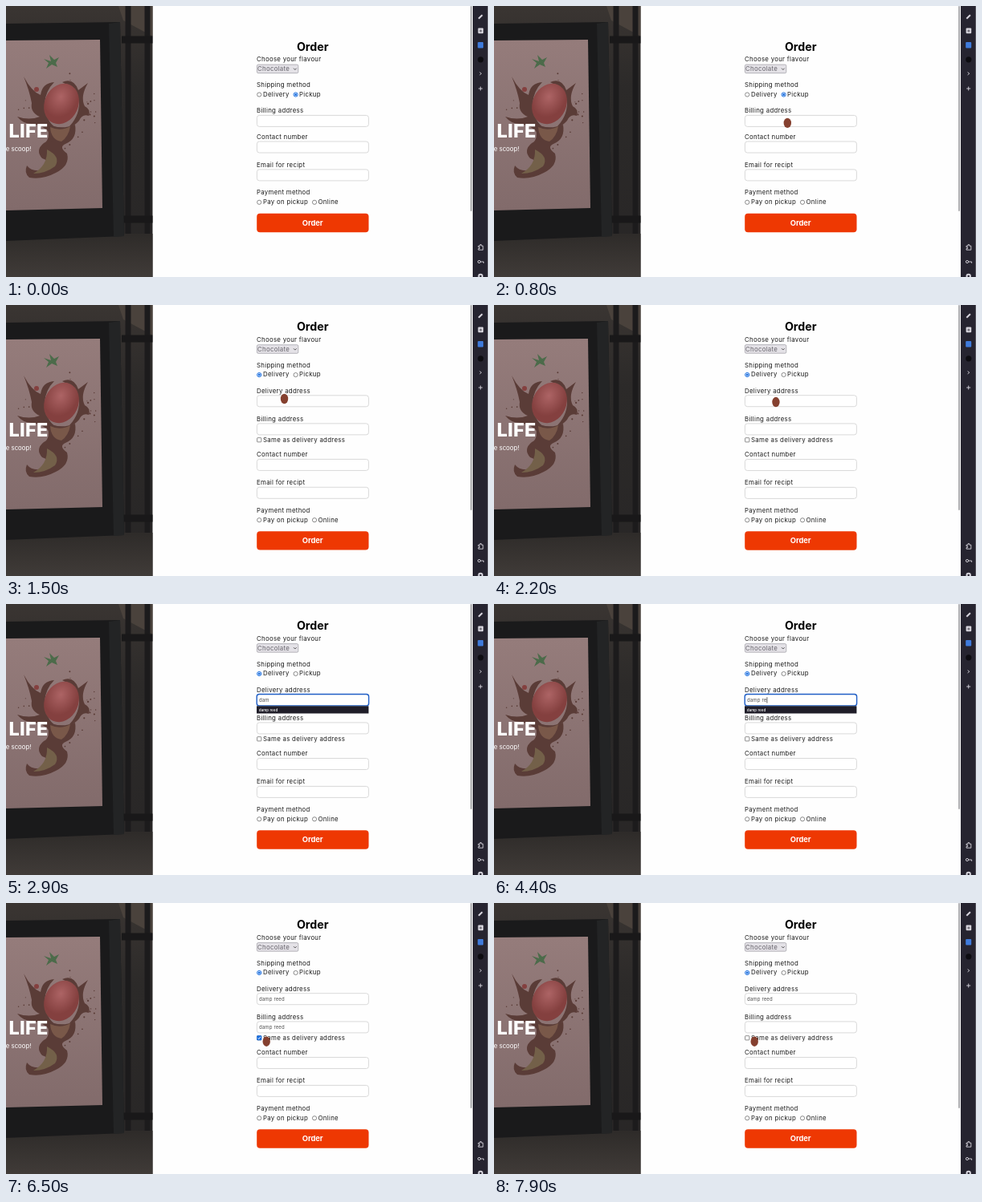
An HTML page for the animation above (8000 ms loop, 600 by 338 pixels).

```html
<!DOCTYPE html>
<html lang="en">
<head>
<meta charset="utf-8">
<title>Order form</title>
<style>
  html, body { margin: 0; width: 100%; height: 100%; overflow: hidden; background: #fff; }
  svg { display: block; width: 100vw; height: 100vh; }
  text { font: 400 7.8px Inter, "Open Sans", sans-serif; letter-spacing: .31px; fill: #1c1c1c; }
  .title { font-size: 14.2px; font-weight: 700; letter-spacing: 0; text-anchor: middle; fill: #000; }
  .action { font-size: 9.3px; font-weight: 700; letter-spacing: 0; text-anchor: middle; fill: #fff; }
  .slogan { font-size: 23.4px; font-weight: 800; letter-spacing: .3px; text-anchor: end; fill: #fff; }
  .tagline { font-size: 7.8px; font-weight: 400; letter-spacing: 0; text-anchor: end; fill: #fff; }
  .value { font-size: 6px; letter-spacing: .15px; fill: #505050; white-space: pre; }
  .hint { font-size: 4.6px; letter-spacing: 0; font-weight: 500; fill: #fff; }
  .choice { fill: #66636b; }
  .field { fill: #fff; stroke: #d0d0d0; stroke-width: .8; }
  .box, .radio { fill: #fff; stroke: #5c5c5c; stroke-width: .7; }
  .on .radio { stroke: #1b6fe0; stroke-width: 1; }
  .dot { fill: #1b6fe0; visibility: hidden; }
  .on .dot { visibility: visible; }
  .tool { fill: none; stroke: #d6d4dc; stroke-width: .9; }
</style>
</head>
<body>
<svg viewBox="0 0 600 338" preserveAspectRatio="none">
  <defs>
    <linearGradient id="wall" x2="0" y2="1">
      <stop offset="0" stop-color="#3a3532"/>
      <stop offset=".3" stop-color="#2c2a29"/>
      <stop offset="1" stop-color="#282626"/>
    </linearGradient>
    <linearGradient id="ground" x2="0" y2="1">
      <stop offset="0" stop-color="#2e2b29"/>
      <stop offset="1" stop-color="#403b38"/>
    </linearGradient>
    <linearGradient id="paper" x2="0" y2="1">
      <stop offset="0" stop-color="#957c7b"/>
      <stop offset="1" stop-color="#826b6b"/>
    </linearGradient>
    <radialGradient id="scoop" cx=".4" cy=".35">
      <stop offset="0" stop-color="#ad6465"/>
      <stop offset="1" stop-color="#84403f"/>
    </radialGradient>
    <clipPath id="photoClip"><rect width="182.5" height="338"/></clipPath>
    <clipPath id="deliveryClip"><rect x="310" y="100" width="144" height="35"/></clipPath>
    <clipPath id="sameClip"><rect x="310" y="162" width="144" height="12"/></clipPath>
  </defs>

  <rect width="600" height="338" fill="#fefefe"/>

  <g clip-path="url(#photoClip)">
    <rect width="183" height="338" fill="url(#wall)"/>
    <path d="M140 0H183V38L146 18Z" fill="#4a423c"/>
    <path d="M152 0V288M176 0V284" stroke="#1c1b1c" stroke-width="7"/>
    <path d="M144 42H183M144 266H183" stroke="#191819" stroke-width="9"/>
    <rect y="284" width="183" height="54" fill="url(#ground)"/>
    <path d="M0 22L142 20 147 287 0 293Z" fill="#1a1a1b"/>
    <path d="M128 22L142 20 147 287 134 288Z" fill="#232425"/>
    <path d="M0 43L117 42 120 252 0 255Z" fill="url(#paper)"/>
    <g id="splash" fill="#5a3c37">
      <path d="M22 88Q32 107 43 111 45 96 60 95 49 106 48 122 49 143 62 152L56 160Q47 149 34 147 22 148 14 138 29 143 42 138 30 133 32 121 29 105 22 88Z"/>
      <path d="M70 95Q84 89 90 105L102 96Q92 113 98 125 106 129 103 137 95 134 91 143 85 150 76 153 91 139 91 121 88 104 70 95Z"/>
      <path d="M50 145Q65 156 86 148 89 166 74 172 65 176 76 184 80 199 62 208 45 217 29 214 22 208 26 199 34 209 50 203 59 195 45 190 36 180 47 171 57 167 50 145Z"/>
    </g>
    <path d="M55 151Q68 157 80 150 78 163 69 169 56 167 55 151Z" fill="#795849"/>
    <path d="M51 179Q69 188 61 200 49 209 34 209 52 199 51 179Z" fill="#736049"/>
    <ellipse cx="69" cy="122" rx="21" ry="26" transform="rotate(24 69 122)" fill="url(#scoop)"/>
    <circle cx="38" cy="104" r="3" fill="#84403f"/>
    <path d="M47 66L56 69 54 61 60 67 66 64 62 71 64 76 57 73 50 78 53 71Z" fill="#4c6b4a"/>
    <text class="slogan" x="52.5" y="164">LIFE</text>
    <text class="tagline" x="31.5" y="181">e scoop!</text>
  </g>

  <g id="upper">
    <text class="title" x="381.7" y="32">Order</text>
    <text x="312" y="45.8">Choose your flavour</text>
    <rect x="312.4" y="49.6" width="51.4" height="10.6" rx="1.5" fill="#e4e2e7" stroke="#9d9ba2" stroke-width=".7"/>
    <text class="choice" x="313" y="57.7">Chocolate</text>
    <path d="M358 54.2l1.8 1.8 1.8-1.8" fill="none" stroke="#444" stroke-width=".9"/>
    <text x="312" y="77.8">Shipping method</text>
    <g id="byCourier"><circle class="radio" cx="315.2" cy="87" r="2.6"/><circle class="dot" cx="315.2" cy="87" r="1.5"/></g>
    <text x="320" y="89.4">Delivery</text>
    <g id="byPickup"><circle class="radio" cx="360.6" cy="87" r="2.6"/><circle class="dot" cx="360.6" cy="87" r="1.5"/></g>
    <text x="365" y="89.4">Pickup</text>
    <g id="delivery" clip-path="url(#deliveryClip)">
      <text x="312" y="109.8" id="deliveryLabel"></text>
      <text x="312" y="121" id="deliveryWrap">address</text>
      <rect id="deliveryField" class="field" x="312.4" y="112.7" width="139" height="14" rx="3"/>
      <text id="typed" class="value" x="315" y="122"></text>
    </g>
  </g>

  <g id="billing">
    <text x="312" y="144.8">Billing address</text>
    <rect class="field" x="312.4" y="147.9" width="139" height="14" rx="3"/>
    <text id="copied" class="value" x="315" y="157.2">damp reed</text>
    <g id="same" clip-path="url(#sameClip)">
      <rect class="box" x="312.6" y="165.7" width="5.2" height="5.2" rx=".6"/>
      <g id="tick">
        <rect x="312.2" y="165.3" width="6" height="6" rx="1" fill="#1b6fe0"/>
        <path d="M313.5 168.4l1.2 1.3 2.2-2.8" fill="none" stroke="#fff" stroke-width=".9"/>
      </g>
      <text x="320" y="170.8" id="sameLabel"></text>
    </g>
  </g>

  <g id="lower">
    <text x="312" y="189.3">Contact number</text>
    <rect class="field" x="312.4" y="192.5" width="139" height="14" rx="3"/>
    <text x="312" y="224">Email for recipt</text>
    <rect class="field" x="312.4" y="227.4" width="139" height="14" rx="3"/>
    <text x="312" y="258.8">Payment method</text>
    <circle class="radio" cx="315.2" cy="268.3" r="2.6"/>
    <text x="320" y="270.8">Pay on pickup</text>
    <circle class="radio" cx="384" cy="268.3" r="2.6"/>
    <text x="388.6" y="270.8">Online</text>
    <rect x="312.2" y="282.3" width="139.3" height="23.4" rx="4" fill="#ee3802"/>
    <text class="action" x="381.7" y="297.4">Order</text>
  </g>

  <rect id="ring" x="312.2" y="112.5" width="139.4" height="14.4" rx="3" fill="none" stroke="#2160c8" stroke-width="1.4"/>
  <rect id="caret" y="116.2" width=".7" height="7.4" fill="#222"/>
  <g id="suggestion">
    <rect x="312" y="127.3" width="139.4" height="9.2" fill="#201e29"/>
    <text class="hint" x="314.8" y="133.7">damp reed</text>
  </g>

  <rect x="578.3" width="1.5" height="256" rx=".7" fill="#909094"/>
  <rect x="581" width="19" height="338" fill="#262430"/>
  <rect x="599.2" width=".8" height="338" fill="#63616b"/>
  <path d="M588.3 15.8l4.6-4.6" class="tool" style="stroke-width:2"/>
  <rect x="587.6" y="27.6" width="6.6" height="6.6" rx="1" fill="#d6d4dc"/>
  <circle cx="590.9" cy="30.9" r="1.5" fill="#77747e"/>
  <rect x="587.2" y="45" width="7" height="7.4" rx="1" fill="#3f7bdc"/>
  <circle cx="590.8" cy="66.8" r="3.6" fill="#0d0c11"/>
  <path class="tool" d="M589.6 82.6l2.2 1.7-2.2 1.7M588.2 103h5M590.7 100.5v5"/>
  <path class="tool" d="M588 299.2h2v-1.5h1.8v1.5h2v5h-5.8v-1.6h1.4v-1.8h-1.4z"/>
  <circle class="tool" cx="589" cy="319" r="1.6"/>
  <path class="tool" d="M590.6 319h4v1.8"/>
  <circle class="tool" cx="590.7" cy="337" r="2.2" style="stroke-width:2"/>

  <ellipse id="pointer" rx="4.7" ry="6.2" fill="#85402f"/>
</svg>

<script>
const LOOP = 8000;
const ADDRESS = "damp reed";
const KEY_TIMES = [2500, 2600, 2700, 3800, 4000, 4200, 4400, 4700, 4900];
// Pointer stops: time, x, y
const POINTER = [
  [700, 368, 150], [1150, 346.7, 117.5], [1500, 346.5, 117], [2100, 351, 121],
  [5500, 319.6, 147], [6250, 324.2, 172.7]
];
const el = Object.fromEntries([...document.querySelectorAll("[id]")].map(e => [e.id, e]));
const deliveryRect = el.deliveryClip.firstElementChild;
const sameRect = el.sameClip.firstElementChild;

const clamp = v => Math.min(1, Math.max(0, v));
const within = (t, ...spans) => spans.some(([from, to]) => t >= from && t < to);
const show = (node, on) => node.setAttribute("visibility", on ? "visible" : "hidden");
const shiftY = (node, y) => node.setAttribute("transform", `translate(0 ${y})`);

function addDroplets() {
  let seed = 11;
  const random = () => (seed = seed * 16807 % 2147483647) / 2147483647;
  for (let i = 0; i < 26; i++) {
    const angle = random() * Math.PI * 2, reach = 34 + random() * 17;
    const drop = document.createElementNS("http://www.w3.org/2000/svg", "circle");
    drop.setAttribute("cx", 64 + Math.cos(angle) * reach);
    drop.setAttribute("cy", 132 + Math.sin(angle) * reach);
    drop.setAttribute("r", .4 + random() * .8);
    el.splash.append(drop);
  }
}

function pointerAt(t) {
  const next = POINTER.findIndex(stop => stop[0] > t);
  if (next < 1) return (next ? POINTER.at(-1) : POINTER[0]).slice(1);
  const [t0, x0, y0] = POINTER[next - 1], [t1, x1, y1] = POINTER[next];
  const k = (t - t0) / (t1 - t0), ease = k * k * (3 - 2 * k);
  return [x0 + (x1 - x0) * ease, y0 + (y1 - y0) * ease];
}

function layout(t) {
  const open = 1 - (1 - clamp((t - 1215) / 300)) ** 1.8;
  const rest = 1 - open, wrapped = open < .85;
  shiftY(el.upper, 23.5 * rest);
  shiftY(el.billing, -11.5 * rest);
  shiftY(el.lower, -23.5 * rest);
  deliveryRect.setAttribute("height", 35 * open);
  sameRect.setAttribute("height", 12 * open);
  el.delivery.setAttribute("opacity", open);
  el.same.setAttribute("opacity", open);
  el.deliveryLabel.textContent = wrapped ? "Delivery" : "Delivery address";
  el.sameLabel.textContent = wrapped ? "Same as" : "Same as delivery address";
  show(el.deliveryWrap, wrapped);
  shiftY(el.deliveryField, wrapped ? 10 : 0);
}

function render(t) {
  layout(t);
  const courier = t >= 1200;
  el.byCourier.classList.toggle("on", courier);
  el.byPickup.classList.toggle("on", !courier);

  el.typed.textContent = ADDRESS.slice(0, KEY_TIMES.filter(key => t >= key).length);
  el.caret.setAttribute("x", 315.2 + el.typed.getComputedTextLength());
  show(el.caret, within(t, [2400, 2900], [3500, 5100], [5700, 6200]));
  show(el.ring, within(t, [2400, 6300]));
  show(el.suggestion, within(t, [2500, 6300]));

  const checked = within(t, [6400, 7100]);
  show(el.tick, checked);
  show(el.copied, checked);

  const [x, y] = pointerAt(t);
  el.pointer.setAttribute("transform", `translate(${x} ${y})`);
  show(el.pointer, within(t, [700, 2500], [5400, LOOP]));
}

addDroplets();
render(0);
let start;
requestAnimationFrame(function tick(now) {
  start ??= now;
  render((now - start) % LOOP);
  requestAnimationFrame(tick);
});
</script>
</body>
</html>
```
